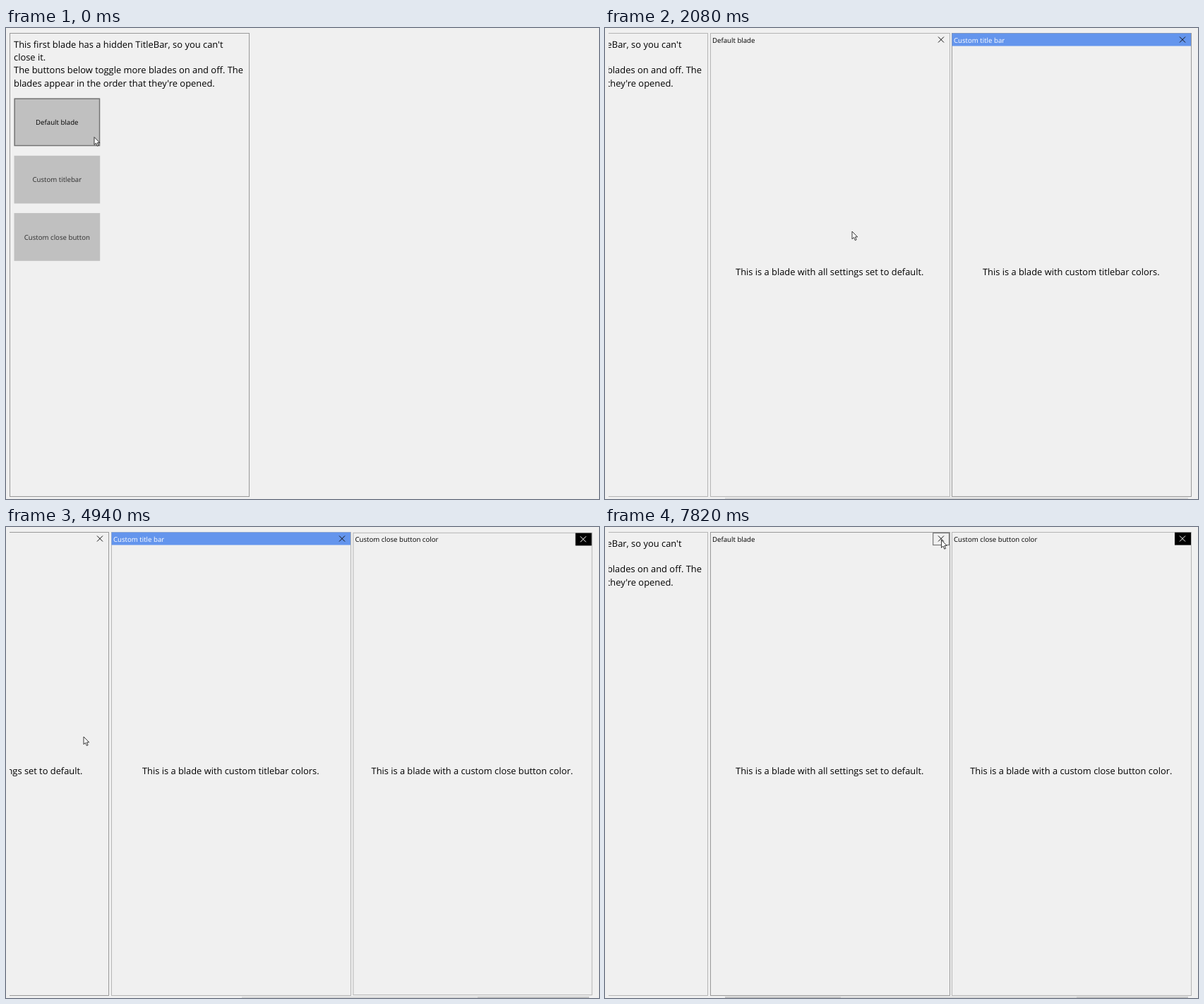
An HTML page for the animation above (8 s loop, 840 by 667 pixels).

```html
<!DOCTYPE html>
<html lang="en">
<head>
<meta charset="utf-8">
<title>Blades</title>
<style>
  html, body { margin: 0; width: 100%; height: 100%; overflow: hidden; background: #f0f0f0; }
  svg { display: block; width: 100%; height: 100%; }
  text { font-family: "Open Sans", "Noto Sans", sans-serif; text-rendering: geometricPrecision; }
  .para { font-size: 12.92px; }
  .body { font-size: 12.86px; text-anchor: middle; }
  .title { font-size: 9.67px; }
  .label { font-size: 9.67px; text-anchor: middle; }
</style>
</head>
<body>
<svg id="stage" viewBox="0 0 840 667">
  <defs><clipPath id="view"><rect x="5" width="829" height="667"/></clipPath></defs>
  <rect width="840" height="667" fill="#f0f0f0"/>
</svg>
<script>
const LOOP = 8000, PITCH = 342.4, LEFT = 5.4;
const stage = document.getElementById('stage');

function add(parent, tag, attrs, content) {
  const el = document.createElementNS('http://www.w3.org/2000/svg', tag);
  set(el, attrs);
  if (content) el.textContent = content;
  parent.appendChild(el);
  return el;
}
function set(el, attrs) {
  for (const key in attrs) el.setAttribute(key, attrs[key]);
}
const clamp = v => Math.min(1, Math.max(0, v));
const progress = (t, from, to) => clamp((t - from) / (to - from));
const easeOut = p => 1 - (1 - p) ** 3;
const easeInOut = p => p * p * (3 - 2 * p);

// Value of the last [start, value] pair that has begun
const stepAt = (steps, t) => steps.filter(s => t >= s[0]).pop()[1];

// Scene
const view = add(stage, 'g', { 'clip-path': 'url(#view)' });

function makeBlade(title, message, barColor, closeColor) {
  const g = add(view, 'g', {});
  const border = add(g, 'rect', { x: 0.5, y: 7.5, width: 339, height: 656, fill: '#f0f0f0' });
  const blade = { g, border };
  if (!title) return blade;
  if (barColor) add(g, 'rect', { x: 0.5, y: 7.5, width: 338.5, height: 18, fill: barColor });
  add(g, 'text', { class: 'title', x: 3, y: 20.7, fill: barColor ? '#fff' : '#000' }, title);
  if (closeColor) add(g, 'rect', { x: 316, y: 7.7, width: 23, height: 17.9, fill: closeColor });
  add(g, 'path', {
    d: 'M323 12.5l8 8m0 -8l-8 8', fill: 'none', 'stroke-width': 1,
    stroke: closeColor ? '#fff' : '#111'
  });
  blade.hot = add(g, 'rect', {
    x: 315.7, y: 8.5, width: 22.8, height: 17, fill: 'none', stroke: '#777', 'stroke-width': 1.2
  });
  add(g, 'text', { class: 'body', x: 169.3, y: 350 }, message);
  return blade;
}

const blades = [
  makeBlade(),
  makeBlade('Default blade', 'This is a blade with all settings set to default.'),
  makeBlade('Custom title bar', 'This is a blade with custom titlebar colors.', '#6495ed'),
  makeBlade('Custom close button color', 'This is a blade with a custom close button color.', null, '#000')
];

[
  "This first blade has a hidden TitleBar, so you can't",
  'close it.',
  'The buttons below toggle more blades on and off. The',
  "blades appear in the order that they're opened."
].forEach((line, i) =>
  add(blades[0].g, 'text', { class: 'para', x: 6, y: 27.6 + 18.3 * i }, line));

const buttons = ['Default blade', 'Custom titlebar', 'Custom close button'].map((label, i) => {
  const y = 99.5 + 81.3 * i, g = blades[0].g;
  return {
    y,
    face: add(g, 'rect', { x: 6.5, y, width: 121.7, height: 67.7 }),
    edge: add(g, 'rect', {
      x: 7.2, y: y + 0.7, width: 120.3, height: 66.3,
      fill: 'none', stroke: '#737373', 'stroke-width': 1.4
    }),
    text: add(g, 'text', { class: 'label', x: 67.3, y: y + 37.6 }, label)
  };
});

const thumb = add(stage, 'rect', { y: 665, height: 2, fill: '#c4c4c4' });
const thumbPale = add(stage, 'rect', { y: 665, height: 2, fill: '#d9d9d9' });
const cursor = add(stage, 'path', {
  d: 'M0 0V10.8L2.5 8.5L4.3 12.7L6.1 11.9L4.4 7.9H7.7Z',
  fill: '#fff', stroke: '#222', 'stroke-width': 0.9
});

// Pointer moves: [start, end, x, y]
const moves = [
  [0, 0, 125, 154.5], [470, 850, 101, 204], [920, 920, 106, 207], [1230, 1230, 107, 209],
  [1700, 2080, 350, 288], [3080, 3230, 358, 293], [4240, 4400, 110, 297],
  [5340, 5490, 525, 128], [5720, 5720, 526, 129], [5800, 6030, 499.5, 39.5],
  [6040, 6180, 475, 26], [6330, 6490, 473, 22.5], [7740, 7740, 475, 20], [7820, 7820, 476.5, 18.5]
];
function pointerAt(t) {
  let x = 0, y = 0;
  for (const [from, to, mx, my] of moves) {
    if (t < from) break;
    const p = from === to ? 1 : easeInOut(progress(t, from, to));
    x += (mx - x) * p;
    y += (my - y) * p;
  }
  return { x, y };
}

function scrollAt(t) {
  if (t >= 3460 && t < 3930) return 199 * (1 - progress(t, 3400, 3930)) ** 2.5;
  return stepAt([[0, 0], [1380, 199], [3930, 0], [4480, 541.5], [6820, 199]], t);
}

const focusSteps = [[0, 0], [2080, 2], [3080, 1], [5180, -1], [5490, 3], [6820, -1], [7590, 1]];
const pressed = [[70, 150], [1230, 1380], [4400, 4480]];
const entrance = [null, [470, 850], [1740, 2080], [4710, 5020]];

function placeBlade(blade, i, t, scroll) {
  let slot = i, scale = 1, alpha = 1;
  if (entrance[i]) {
    const p = progress(t, ...entrance[i]);
    scale = 0.85 + 0.15 * easeOut(p);
    alpha = clamp(p * 1.8);
  }
  if (i === 2 && t >= 6820) {
    const p = progress(t, 6820, 7085);
    scale = 1 - 0.15 * p;
    alpha = (1 - p) ** 1.75;
  }
  if (i === 3) slot -= easeOut(progress(t, 7060, 7450));
  const x = Math.round(LEFT + PITCH * slot - scroll);
  set(blade.g, {
    transform: `translate(${x} 0) translate(170 335.5) scale(${scale}) translate(-170 -335.5)`,
    opacity: alpha,
    visibility: alpha > 0 ? 'visible' : 'hidden'
  });
  const focused = stepAt(focusSteps, t) === i;
  set(blade.border, { stroke: focused ? '#999' : '#b5b5b5' });
  if (blade.hot) {
    const hot = i === 2 ? t >= 6330 : i === 1 && t >= 7590;
    set(blade.hot, { opacity: hot ? 1 : 0 });
  }
}

function drawButtons(t, pointer, scroll) {
  const px = pointer.x + scroll;
  buttons.forEach((b, i) => {
    const over = px > 11 && px < 134 && pointer.y > b.y && pointer.y < b.y + 68;
    const down = t >= pressed[i][0] && t < pressed[i][1];
    set(b.face, { fill: down ? '#9c9c9c' : '#c0c0c0' });
    set(b.edge, { opacity: over && !down ? 1 : 0 });
    set(b.text, { fill: over ? '#000' : '#2e2e2e' });
  });
}

function drawScrollbar(t, scroll) {
  const four = t >= 4480 && t < 6820;
  const width = four ? 492 : 656;
  const x = 13 + (813 - width) * scroll / (four ? 541.5 : 199);
  const paleFrom = Math.max(x, t < 4480 ? 170 : 334);
  const paleTo = Math.min(x + width, t < 3930 ? 826 : 668);
  const opacity = t >= 1380 ? 1 : 0;
  set(thumb, { x, width, opacity });
  set(thumbPale, { x: paleFrom, width: Math.max(0, paleTo - paleFrom), opacity });
}

function draw(t) {
  const scroll = scrollAt(t), pointer = pointerAt(t);
  blades.forEach((blade, i) => placeBlade(blade, i, t, scroll));
  drawButtons(t, pointer, scroll);
  drawScrollbar(t, scroll);
  set(cursor, { transform: `translate(${pointer.x} ${pointer.y})` });
}

const start = performance.now();
function tick() {
  draw((performance.now() - start) % LOOP);
  requestAnimationFrame(tick);
}
tick();
</script>
</body>
</html>
```
